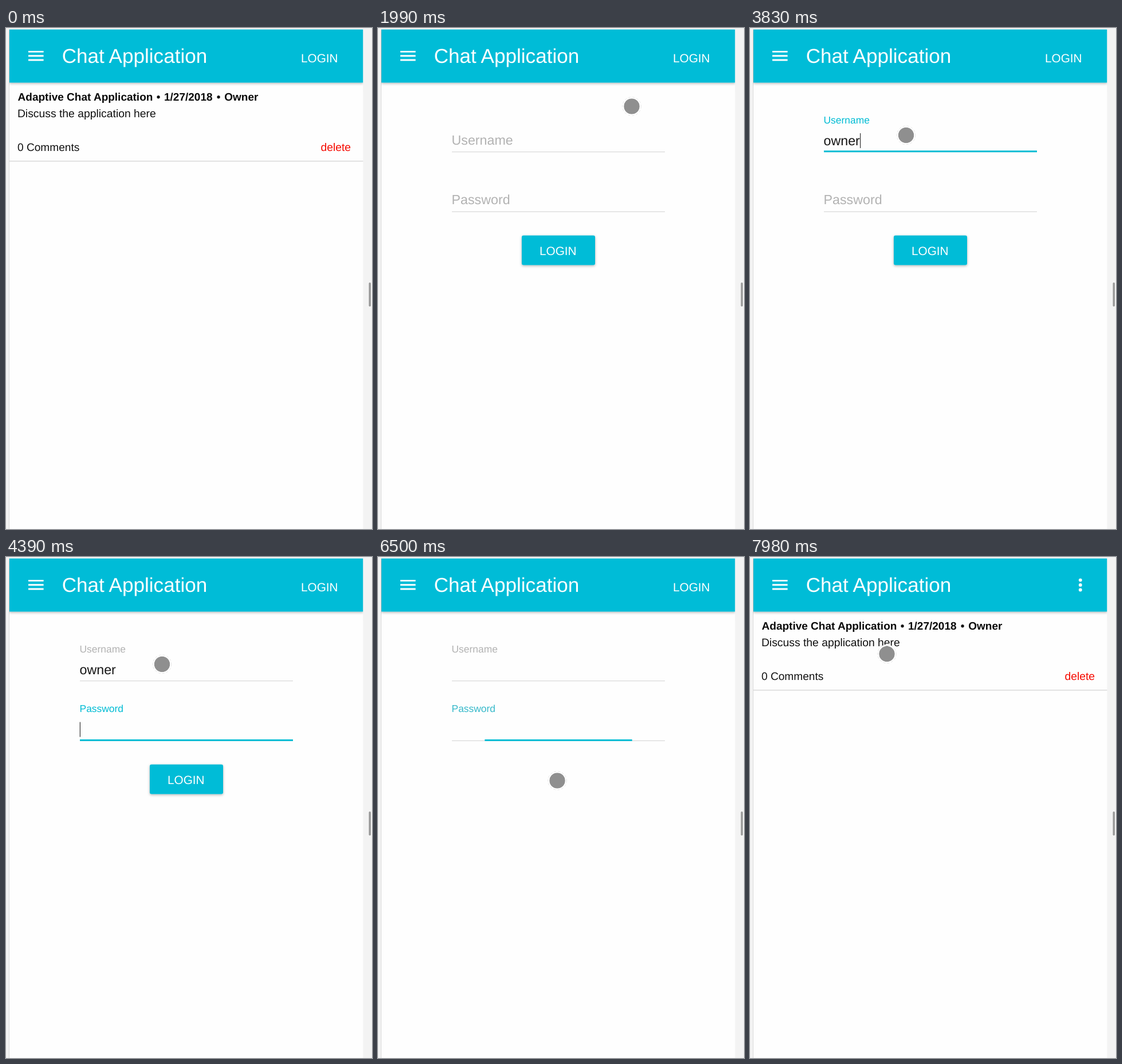
Recreate the animation shown at these times as an HTML page. Size 639 by 876 pixels, loop 8 s.

```html
<!DOCTYPE html>
<html lang="en">
<head>
<meta charset="utf-8">
<title>Chat Application</title>
<style>
  html, body { margin: 0; width: 100%; height: 100%; overflow: hidden; background: #f3f3f3; }
  svg { display: block; width: 100%; height: 100%; }
  text { font-family: "Liberation Sans", Arial, sans-serif; text-rendering: geometricPrecision; white-space: pre; }
  .body { font-size: 19.35px; fill: #111; }
  .bold { font-size: 19px; font-weight: bold; fill: #0a0a0a; }
  .btn { font-size: 20.8px; fill: #fff; }
  .value { font-size: 23.25px; fill: #161616; }
</style>
</head>
<body>
<svg viewBox="0 0 639 876">
  <defs>
    <filter id="shade" x="-10%" y="-20%" width="120%" height="150%">
      <feDropShadow dx="0" dy="1.5" stdDeviation="2" flood-color="#000" flood-opacity=".3"/>
    </filter>
  </defs>
  <rect width="639" height="876" fill="#f3f3f3"/>
  <rect x="5" y="2" width="1" height="874" fill="#dadada"/>
  <rect x="6" y="2" width="617.5" height="874" fill="#fefefe"/>
  <rect x="633.5" y="445" width="3.5" height="42" rx="1.7" fill="#999"/>

  <g id="card">
    <text class="bold" x="20.6" y="126.7">Adaptive Chat Application</text>
    <text class="bold" x="266" y="126.7" text-anchor="middle">•</text>
    <text class="bold" x="276" y="126.7">1/27/2018</text>
    <text class="bold" x="371" y="126.7" text-anchor="middle">•</text>
    <text class="bold" x="381.3" y="126.7">Owner</text>
    <text class="body" x="19.9" y="156.3">Discuss the application here</text>
    <text class="body" x="20" y="214.6" style="font-size:19.1px">0 Comments</text>
    <text class="body" x="549.4" y="214.6" style="fill:#f50b00">delete</text>
    <rect x="6" y="232" width="617.5" height="1.5" fill="#d9d9d9"/>
  </g>

  <g id="form">
    <g id="user"></g>
    <g id="pass" transform="translate(0 104.6)"></g>
    <g id="submit">
      <rect x="251" y="362.7" width="128" height="51.8" rx="3" fill="#00bcd7" filter="url(#shade)"/>
      <text class="btn" x="281.9" y="397.2">LOGIN</text>
    </g>
  </g>

  <rect x="6" y="2.5" width="617.5" height="93" fill="#00bcd7" filter="url(#shade)"/>
  <rect x="0" y="0" width="639" height="2.2" fill="#f0f2f2"/>
  <rect x="0" y="2" width="5" height="110" fill="#f3f3f3"/>
  <rect x="623.5" y="2" width="15.5" height="110" fill="#f3f3f3"/>
  <path d="M39 41.4h26.6M39 48.7h26.6M39 56h26.6" stroke="#fff" stroke-width="2.9"/>
  <text x="97.7" y="60.8" font-size="35.1" fill="#fff">Chat Application</text>
  <text id="login" class="btn" x="514.9" y="60">LOGIN</text>
  <g id="menu" fill="#fff">
    <circle cx="576.8" cy="40.3" r="2.9"/>
    <circle cx="576.8" cy="48.9" r="2.9"/>
    <circle cx="576.8" cy="57.5" r="2.9"/>
  </g>

  <g id="touch">
    <circle r="13.8" fill="#000" fill-opacity=".435"/>
    <circle r="15.2" fill="none" stroke="#fff" stroke-width="2.7"/>
    <circle r="16.2" fill="none" stroke="#000" stroke-opacity=".13" stroke-width=".8" stroke-dasharray="4 3"/>
  </g>
</svg>
<script>
const LOOP = 8000, LEFT = 129, WIDE = 372;
const $ = id => document.getElementById(id);
const show = (el, on) => el.setAttribute('visibility', on ? 'inherit' : 'hidden');

// Moves of the touch point: start, step length, then x, y per step
const MOVES = [
  [210, 80, [518,683, 525,460, 540,275, 545,138, 551,62, 552,39]],
  [840, 76, [552,36, 554,27, 557,16, 558,22, 554,40, 552,51]],
  [1765, 78, [540,66, 500,106, 443,137, 411,148, 383,155, 350,159, 326,159, 314,158]],
  [2380, 77, [300,168, 290,177, 282,183, 277,187, 274,188]],
  [2920, 80, [272.5,187.5]],
  [5646, 76, [276,202, 284,234, 294,270, 304,312, 311,348, 313,376, 313,391]],
  [7750, 77, [303,330, 272,262, 250,205, 239,169.5]]
];

// Page and field timing
const OPEN = 1610, FOCUS = 3080, TAB = 4000, CLEAR = 6500, DONE = 7350;
const NAME = 'owner', NAME_KEYS = [3370, 3480, 3600, 3760, 3830];
const DOT_KEYS = [4470, 4620, 4790, 4940, 5030];

function ease(t, start) {
  if (t < start) return 0;
  const ms = 32 + 77 * Math.floor((t - start) / 77);
  return 1 - (1 - Math.min(1, ms / 450)) ** 5;
}
const typed = (t, keys) => keys.filter(k => t >= k).length;
const mix = (a, b, p) => a + (b - a) * p;
const tint = p => {
  const [r, g, b] = [[178, 0], [178, 188], [178, 212]].map(([from, to]) => Math.round(mix(from, to, p)));
  return `rgb(${r},${g},${b})`;
};

function field(id, label) {
  const g = $(id);
  g.innerHTML = `
    <rect x="${LEFT}" y="216" width="${WIDE}" height="1.2" fill="#d8d8d8"/>
    <rect y="214.3" height="2.9" fill="#00bcd4"/>
    <text>${label}</text>
    <text class="value" x="128.5" y="205.3"></text>
    <rect y="184" width="1.1" height="26" fill="#222"/>`;
  const [, line, name, value, caret] = g.children;
  return (float, focus, text, width, blink) => {
    line.setAttribute('x', LEFT + WIDE * (1 - focus) / 2);
    line.setAttribute('width', WIDE * focus);
    name.setAttribute('transform', `translate(128.5 ${mix(203.6, 166.8, float)})`);
    name.setAttribute('font-size', mix(23.25, 17.44, float));
    name.setAttribute('fill', tint(focus));
    value.textContent = text;
    caret.setAttribute('x', LEFT - .2 + width);
    show(caret, blink);
  };
}
const user = field('user', 'Username'), pass = field('pass', 'Password');
const NAME_ENDS = [0, 12.9, 29.7, 42.6, 55.6, 63.3];

function touch(t) {
  let at = null;
  for (const [start, step, p] of MOVES) {
    if (t < start) break;
    const i = Math.min(p.length / 2 - 1, Math.floor((t - start) / step));
    at = [p[2 * i], p[2 * i + 1]];
  }
  show($('touch'), at);
  if (at) $('touch').setAttribute('transform', `translate(${at})`);
}

function draw(t) {
  const form = t >= OPEN && t < DONE, live = t < CLEAR;
  show($('card'), !form);
  show($('form'), form);
  show($('submit'), live);
  show($('login'), t < DONE);
  show($('menu'), t >= DONE);

  const n = live ? typed(t, NAME_KEYS) : 0, d = live ? typed(t, DOT_KEYS) : 0;
  const tab = ease(t, TAB), focus = ease(t, FOCUS);
  user(focus, focus * (1 - tab), NAME.slice(0, n), NAME_ENDS[n], t >= FOCUS && t < TAB);
  pass(tab, tab * (1 - ease(t, CLEAR)), '•'.repeat(d), d * 8.14,
    t >= TAB && t < 5570 || t >= 6070 && live);
  touch(t);
}

function tick() {
  draw(performance.now() % LOOP);
  requestAnimationFrame(tick);
}
tick();
</script>
</body>
</html>
```
